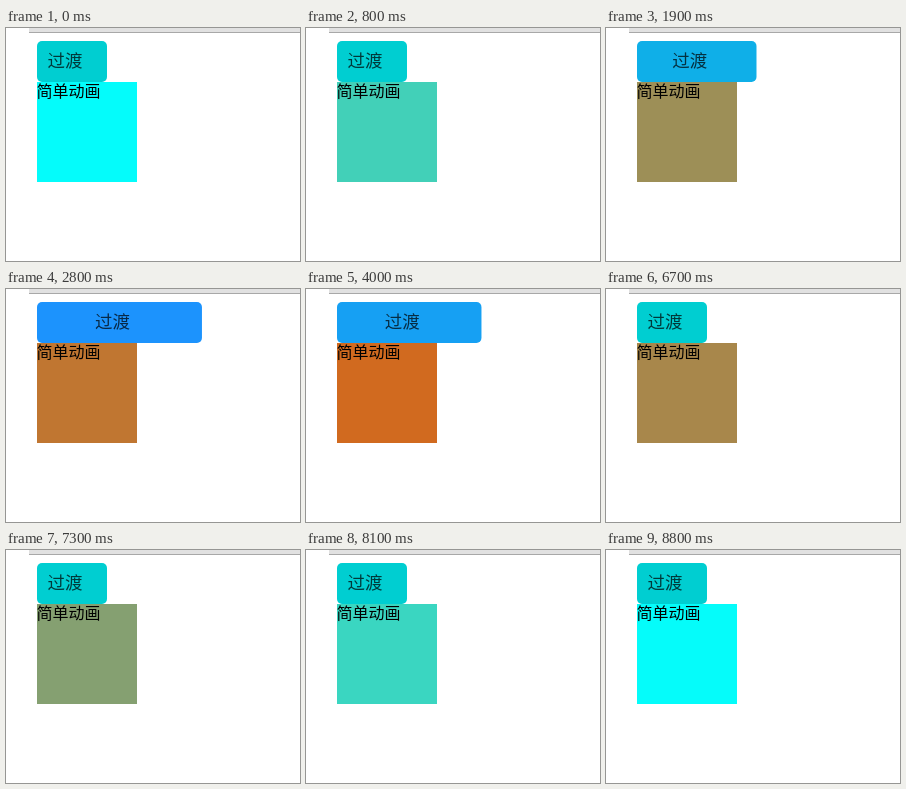
An HTML page that plays this animation: 294x233 px, repeating every 9100 ms.

```html
<!DOCTYPE html>
<html lang="zh">
<head>
<meta charset="utf-8">
<style>
html, body { margin: 0; width: 100%; height: 100%; overflow: hidden; background: #fff; }
svg { display: block; }
text { font-family: "Noto Sans CJK SC", "Noto Sans CJK", sans-serif; font-weight: 300; }
</style>
</head>
<body>
<svg width="294" height="233" viewBox="0 0 294 233">
  <rect x="23" width="271" height="4" fill="#e1e1e1"/>
  <rect x="23" y="4" width="271" height="1" fill="#a8a8a8"/>
  <rect id="box" x="31" y="54" width="100" height="100"/>
  <rect id="button" x="31" y="13" height="41" rx="5"/>
  <text id="label" y="39" font-size="17.5" fill-opacity=".72">过渡</text>
  <text x="30.5" y="69" font-size="16">简单动画</text>
</svg>
<script>
const LOOP = 9100, STEP = 100;
const HALF = 4560, LEAD = 150; // one pass of the box colour, and its head start
const CYAN = [0, 255, 255], CHOCOLATE = [210, 105, 30];
const TURQUOISE = [0, 206, 209], BLUE = [30, 144, 255];

const $ = id => document.getElementById(id);
const box = $('box'), button = $('button'), label = $('label');

const clamp = x => Math.min(1, Math.max(0, x));
const ramp = (t, from, to) => clamp((t - from) / (to - from));
const lerp = (a, b, p) => a + (b - a) * p;
const mix = (a, b, p) => `rgb(${a.map((c, i) => Math.round(lerp(c, b[i], p)))})`;

// cubic-bezier(.25, .1, .25, 1), solved by bisection
function ease(x) {
  let lo = 0, hi = 1, u;
  for (let i = 0; i < 24; i++) {
    u = (lo + hi) / 2;
    if (.75 * u * (1 - u) + u ** 3 < x) lo = u; else hi = u;
  }
  const v = 1 - u;
  return .3 * u * v * v + 3 * u * u * v + u ** 3;
}

function draw(ms) {
  const t = Math.floor((ms % LOOP) / STEP) * STEP;

  const hover = ramp(t, 920, 2900) - ramp(t, 3520, 5400);
  button.setAttribute('width', 70 + 100 * hover);
  button.setAttribute('fill', mix(TURQUOISE, BLUE, hover));
  label.setAttribute('x', 41.5 + 50 * hover);

  const swing = clamp(1 - Math.abs(1 - (t + LEAD) / HALF));
  box.setAttribute('fill', mix(CYAN, CHOCOLATE, ease(swing)));
}

const start = performance.now();
function tick() {
  draw(performance.now() - start);
  requestAnimationFrame(tick);
}
tick();
</script>
</body>
</html>
```
